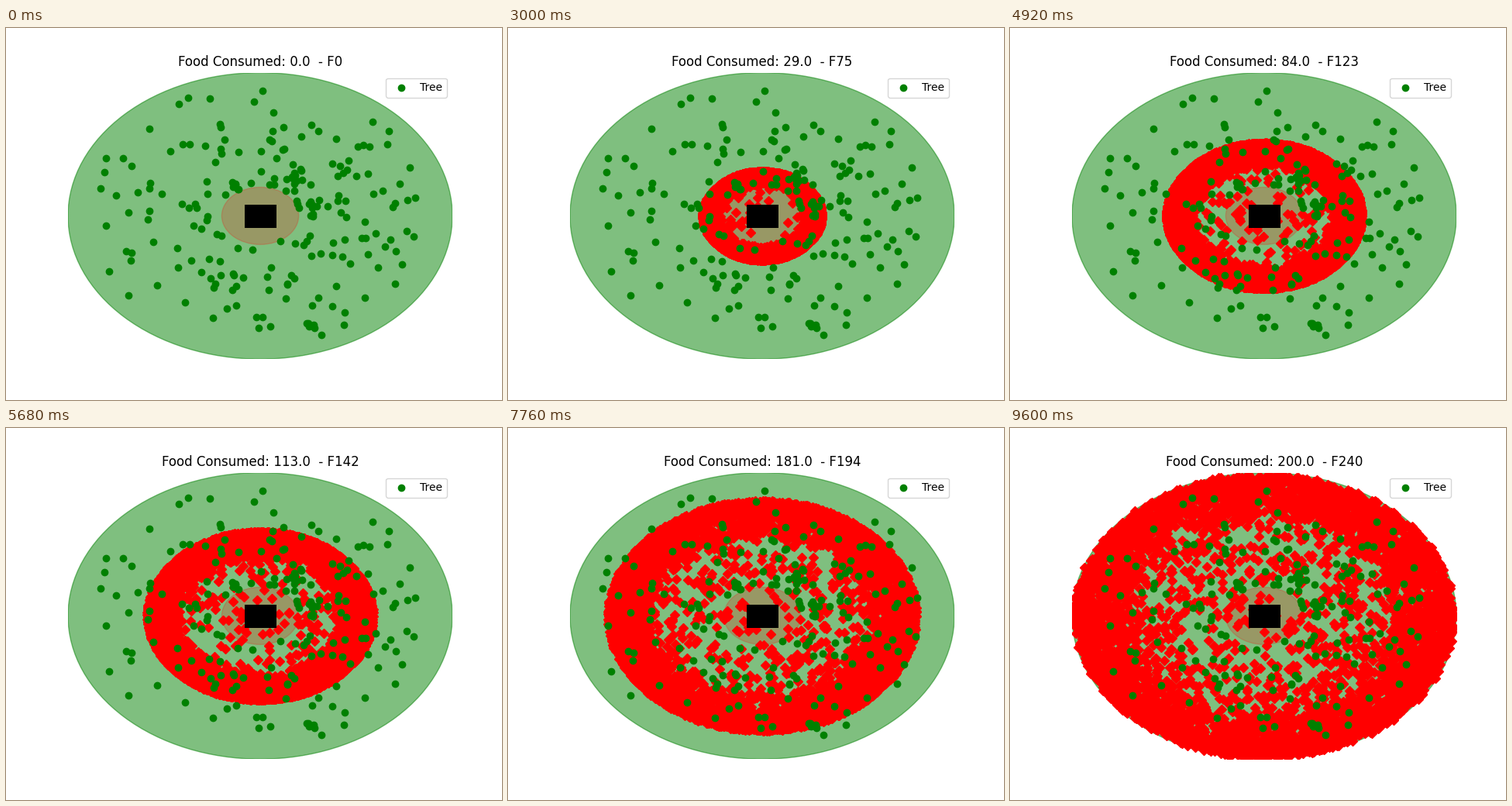
Animation of 640x480 px, one loop 9.64 s. Source, as a matplotlib script:

```python
import numpy as np
import matplotlib.pyplot as plt
from matplotlib.animation import FuncAnimation
from matplotlib.patches import Circle, Rectangle

FRAMES = 241
INTERVAL = 40
R = 240  # field radius
TREES = 200

# Key points of the food count; trees are reached at the same pace.
TIMES = [50, 75, 102, 142, 194, 223, 226]
FOOD = [0, 29, 53, 113, 181, 199, 200]

# Dense groves and lone trees, as (x, y) in stage pixels.
GROVES = [(368, 190), (296, 205), (398, 234), (394, 383)]
LONE = [(129, 168), (129, 255), (133, 314), (223, 98), (331, 81), (473, 121),
        (521, 180), (528, 219), (511, 305), (331, 373)]

rng = np.random.default_rng(7)


def to_field(points):
    x, y = np.array(points).T
    return (x - 328) / 248 * R, (242.4 - y) / 184.8 * R


def polar(r, a):
    return r * np.cos(a), r * np.sin(a)


def angles(count):
    return rng.uniform(0, 2 * np.pi, count)


def make_trees():
    lone = to_field(LONE)
    gx, gy = np.repeat(to_field(GROVES), 6, axis=1)
    dx, dy = rng.normal(0, 7, (2, gx.size))
    free = TREES - len(LONE) - gx.size
    reach = np.interp(np.linspace(1, TREES, free), FOOD, TIMES)
    x, y = polar(0.96 * reach, angles(free))
    return (np.concatenate([lone[0], gx + dx, x]),
            np.concatenate([lone[1], gy + dy, y]))


# Runners stay close behind the front, wanderers settle at a home radius.
run_dir, run_phase = angles(3000), angles(3000)
run_pace = rng.uniform(0.975, 0.995, 3000)
run_pace -= 0.33 * (1 - np.sqrt(rng.random(3000)))

home = R * np.concatenate([rng.random(450) ** (1 / 2),
                           rng.random(1300) ** (1 / 3)])
walk_dir, walk_phase = angles(home.size), angles(home.size)
walk_pace = rng.uniform(0.975, 0.995, home.size)
walk_rate = rng.uniform(0.05, 0.11, home.size)


def ants_at(n):
    x, y = polar(n * run_pace, run_dir + 0.06 * np.sin(n / 25 + run_phase))

    wx, wy = polar(np.minimum(n * walk_pace, home), walk_dir)
    sway = 12 * np.clip((n - home) / 40, 0, 1)
    turn = walk_rate * n + walk_phase
    wx += sway * np.cos(turn)
    wy += sway * np.sin(0.8 * turn + walk_dir)
    return np.concatenate([x, wx]), np.concatenate([y, wy])


def food_at(n):
    return float(int(np.interp(n, TIMES, FOOD)))


fig, ax = plt.subplots(figsize=(6.4, 4.8), dpi=100)
fig.subplots_adjust(left=0.125, right=0.9, bottom=0.11, top=0.88)
ax.set_xlim(-R, R)
ax.set_ylim(-R, R)
ax.axis("off")

ax.add_patch(Circle((0, 0), R, color="green", alpha=0.5))
ax.add_patch(Circle((0, 0), 0.2 * R, color="red", alpha=0.2))
ants, = ax.plot([], [], "D", color="red", zorder=2)
ax.scatter(*make_trees(), color="green", label="Tree", zorder=3)
ax.add_patch(Rectangle((-19.5, -20), 39.5, 39, facecolor="black",
                       linewidth=0, zorder=4))
ax.legend(loc="upper right")
title = ax.set_title("")


def update(n):
    ants.set_data(*ants_at(n))
    title.set_text(f"Food Consumed: {food_at(n)}  - F{n}")
    return ants, title


anim = FuncAnimation(fig, update, frames=FRAMES, interval=INTERVAL,
                     repeat=True, repeat_delay=0)
plt.show()
```
